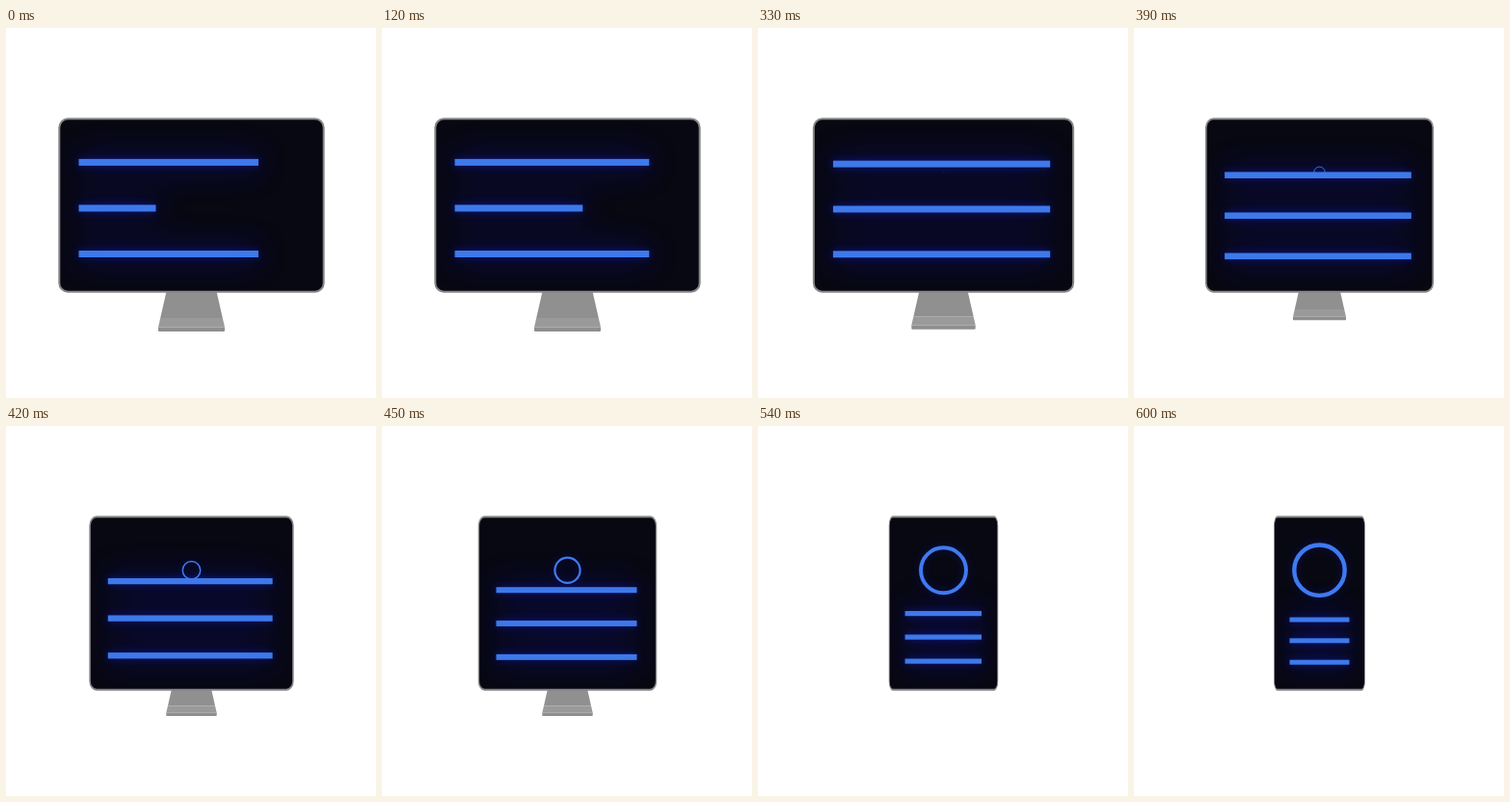
An HTML page for the animation above (0.87 s loop, 384 by 384 pixels).

```html
<!DOCTYPE html>
<html lang="en">
<head>
<meta charset="utf-8">
<title>Desktop to mobile</title>
<style>
  html, body { margin: 0; width: 100%; height: 100%; overflow: hidden; background: #fff; }
  svg { display: block; width: 100%; height: 100%; }
</style>
</head>
<body>
<svg viewBox="0 0 384 384">
  <defs>
    <filter id="wide" filterUnits="userSpaceOnUse" x="0" y="40" width="384" height="290" color-interpolation-filters="sRGB">
      <feGaussianBlur stdDeviation="17"/>
    </filter>
    <filter id="near" filterUnits="userSpaceOnUse" x="0" y="40" width="384" height="290" color-interpolation-filters="sRGB">
      <feGaussianBlur stdDeviation="4.5"/>
    </filter>
    <clipPath id="clip"><rect class="screen" x="55.3" y="94.3" width="274.4" height="179.4" rx="9"/></clipPath>
    <g id="bars"><rect/><rect/><rect/></g>
    <circle id="ring" cx="192.5" cy="149.7" fill="none"/>
  </defs>

  <g id="stand">
    <path d="M170.2 257H214.8L224.8 301H160.2Z" fill="#909090"/>
    <path d="M160.2 301H224.8L227 310.5H158Z" fill="#9a9a9a"/>
    <path d="M158 310.5H227V314Q227 315 226 315H159Q158 315 158 314Z" fill="#8f8f8f"/>
  </g>

  <rect class="screen" x="55.3" y="94.3" width="274.4" height="179.4" rx="9" fill="#080812"/>
  <g clip-path="url(#clip)">
    <use href="#bars" fill="#1010ff" opacity=".6" filter="url(#wide)"/>
    <g fill="#0a28ff" stroke="none" opacity=".42" filter="url(#near)">
      <use href="#bars"/>
      <use href="#ring" stroke="#0a28ff" opacity=".6"/>
    </g>
  </g>
  <rect class="screen" x="55.3" y="94.3" width="274.4" height="179.4" rx="9" fill="none" stroke="#868686" stroke-width="2"/>
  <use href="#bars" fill="#3d79ea"/>
  <use href="#ring" stroke="#3f7af0"/>
</svg>
<script>
  const LOOP = 870, STEP = 30;
  const CX = 192.5, STAND_TOP = 257;
  const screens = document.querySelectorAll('.screen');
  const bars = document.querySelectorAll('#bars rect');
  const ring = document.getElementById('ring');
  const stand = document.getElementById('stand');

  // Starting width, wide-screen y and narrow-screen y of each bar
  const rows = [[186.5, 139.4, 201], [80, 187, 222.8], [186.5, 234.5, 245.2]];

  const mix = (a, b, p) => a + (b - a) * p;
  const ease = (t, from, to) => {
    const p = Math.min(1, Math.max(0, (t - from) / (to - from)));
    return p * p * (3 - 2 * p);
  };
  const set = (el, attrs) => {
    for (const key in attrs) el.setAttribute(key, attrs[key]);
  };

  function draw(t) {
    const grow = ease(t, 0, 300);
    const shrink = ease(t, 300, 600);

    const sx = mix(1, 0.342, shrink);
    screens.forEach(el => set(el, { transform: `translate(${CX} 0) scale(${sx} 1) translate(${-CX} 0)` }));

    const h = mix(7, 5, shrink);
    rows.forEach(([w, y0, y1], i) => set(bars[i], {
      x: mix(75.5, 161.5, shrink),
      y: mix(y0, y1, shrink) - h / 2,
      width: mix(mix(w, 230, grow), 62, shrink),
      height: h
    }));

    set(ring, { r: 26.2 * shrink, 'stroke-width': 4.4 * shrink });

    const size = mix(1, 0.76, ease(t, 300, 420));
    const lift = 48 * ease(t, 450, 600);
    set(stand, {
      transform: `translate(${CX} ${STAND_TOP - lift}) scale(${size}) translate(${-CX} ${-STAND_TOP})`
    });
  }

  const start = performance.now();
  function tick() {
    const t = (performance.now() - start) % LOOP;
    draw(Math.floor((t + 0.5) / STEP) * STEP);
    requestAnimationFrame(tick);
  }
  draw(0);
  requestAnimationFrame(tick);
</script>
</body>
</html>
```
